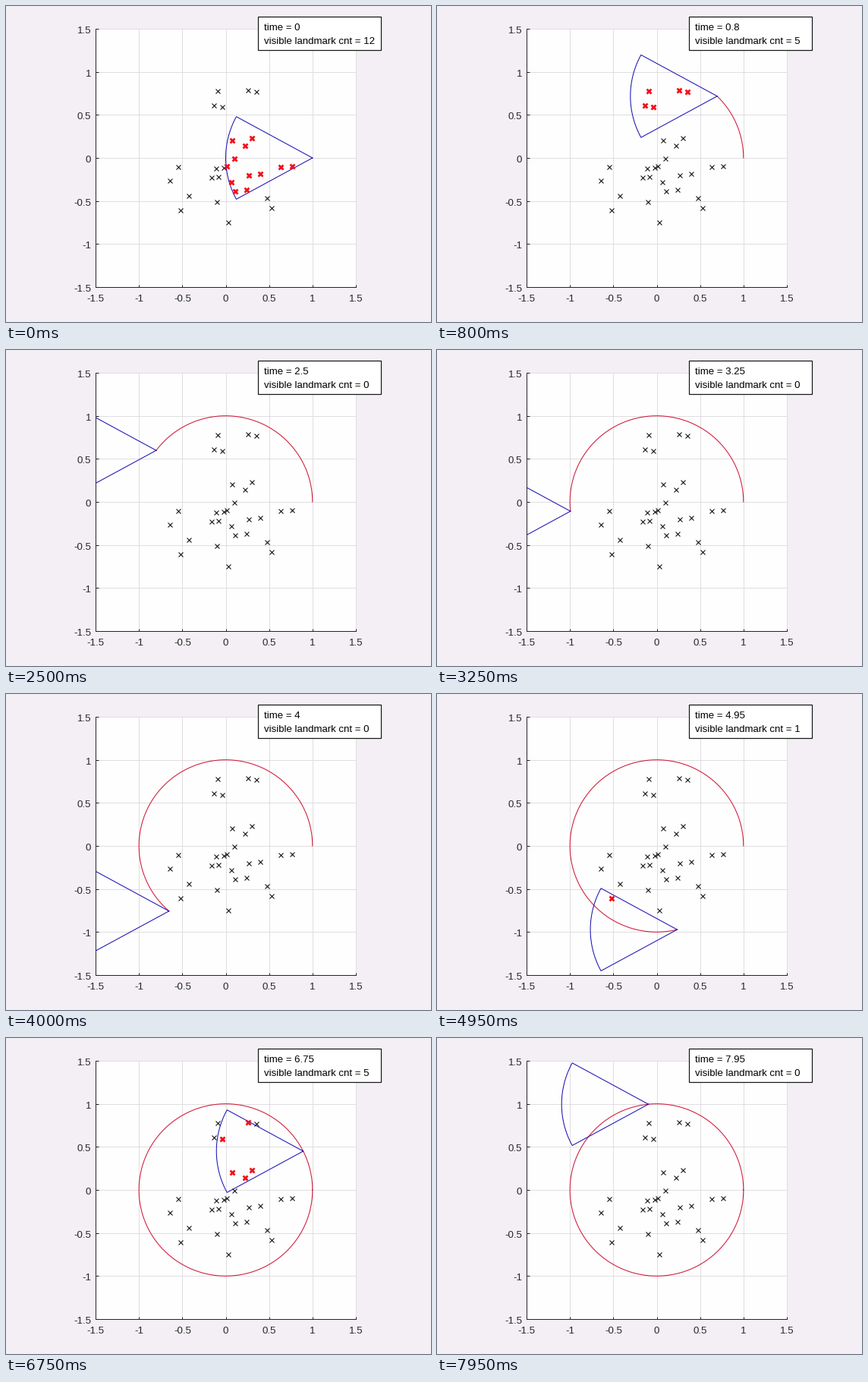
A matplotlib script that plays this animation: 560 by 416 pixels, repeating every 8 s.

```python
import numpy as np
import matplotlib.pyplot as plt
from matplotlib.animation import FuncAnimation
from matplotlib.patches import Rectangle

W, H = 560, 416
PX = 0.72                      # points per pixel at 100 dpi
DT, FRAMES = 0.05, 160
REACH, HALF_ANGLE = 1.0, 0.5   # sensor range and half field of view
LEFT, TOP, RIGHT, BOTTOM = 118, 30, 461, 370
LIM = 1.5
DARK, GRID = "#262626", "#e0dde0"
BLUE, RED_PATH = "#1c14b4", "#cf1838"


def run(start, step, count=2):
    """Evenly spaced landmarks along a line."""
    return np.array(start) + np.outer(np.arange(count), step)


def cell(start, step, fork):
    """A pair of landmarks repeated once: the corners of a parallelogram."""
    pair = run(start, fork)
    return np.vstack([pair, pair + step])


LANDMARKS = np.vstack([
    cell((-0.135, 0.611), (0.395, 0.178), (0.095, -0.022)),
    cell((0.301, 0.231), (-0.202, -0.237), (-0.082, -0.087)),
    cell((-0.024, -0.112), (-0.058, -0.106), (-0.082, -0.009)),
    cell((0.765, -0.095), (-0.37, -0.091), (-0.13, -0.014)),
    cell((0.065, -0.278), (0.414, -0.194), (0.046, -0.114)),
    cell((-0.549, -0.104), (0.122, -0.339), (-0.092, -0.162)),
    run((-0.089, 0.774), (0.165, -0.572), 3),
    run((-0.1, -0.515), (0.13, -0.235)),
])

plt.rcParams["font.family"] = "Liberation Sans"
plt.rcParams["axes.unicode_minus"] = False

fig = plt.figure(figsize=(W / 100, H / 100), dpi=100, facecolor="#f3eff5")
ax = fig.add_axes([LEFT / W, 1 - BOTTOM / H, (RIGHT - LEFT) / W, (BOTTOM - TOP) / H])


def label(x, y, text, ha="left", color=DARK):
    """Text with its baseline at stage pixel (x, y)."""
    return fig.text(x / W, 1 - y / H, text, ha=ha, va="baseline",
                    color=color, fontsize=13.2 * PX, zorder=6)


def setup_axes():
    ticks = np.arange(-LIM, LIM + 0.1, 0.5)
    ax.set(xlim=(-LIM, LIM), ylim=(-LIM, LIM), xticks=ticks, yticks=ticks,
           facecolor="#fefefe", axisbelow=True)
    ax.grid(color=GRID, lw=PX, clip_on=False)
    ax.tick_params(direction="in", length=3.5 * PX, width=PX, color=DARK,
                   labelbottom=False, labelleft=False)
    for side in ("top", "right"):
        ax.spines[side].set_visible(False)
    for side in ("left", "bottom"):
        ax.spines[side].set(color=DARK, linewidth=PX)
    for i, v in enumerate(ticks):
        f = i / (len(ticks) - 1)
        label(LEFT + f * (RIGHT - LEFT), 389, f"{v:g}", "center")
        label(112, BOTTOM - f * (BOTTOM - TOP) + 6, f"{v:g}", "right")


def line(color, zorder, **style):
    return ax.plot([], [], color=color, zorder=zorder, **style)[0]


setup_axes()
trail = line(RED_PATH, 3, lw=1.05 * PX)
wedge = line(BLUE, 3.8, lw=1.05 * PX)
cross = dict(ls="none", marker="x")
hidden = line("black", 3.5, ms=5.6 * PX, mew=PX, **cross)
seen = line("#f5101c", 4, ms=6 * PX, mew=2.7 * PX, **cross)

box = Rectangle((332 / W, 1 - 58 / H), 162 / W, 44 / H, fc="white",
                ec="#141414", lw=1.2 * PX, transform=fig.transFigure, zorder=5)
fig.add_artist(box)
clock = label(340, 32.5, "", color="black")
counter = label(340, 50, "", color="black")

arc = np.pi + np.linspace(-HALF_ANGLE, HALF_ANGLE, 40)
WEDGE_X = np.r_[0, REACH * np.cos(arc), 0]
WEDGE_Y = np.r_[0, REACH * np.sin(arc), 0]


def draw(n):
    t = round(n * DT, 2)
    x, y = np.cos(t), np.sin(t)
    past = np.linspace(0, min(t, 2 * np.pi), n + 1)
    trail.set_data(np.cos(past), np.sin(past))
    wedge.set_data(x + WEDGE_X, y + WEDGE_Y)

    dx, dy = x - LANDMARKS[:, 0], LANDMARKS[:, 1] - y
    visible = (np.hypot(dx, dy) <= REACH) & (np.abs(np.arctan2(dy, dx)) <= HALF_ANGLE)
    seen.set_data(*LANDMARKS[visible].T)
    hidden.set_data(*LANDMARKS[~visible].T)

    clock.set_text(f"time = {t:g}")
    counter.set_text(f"visible landmark cnt = {visible.sum()}")
    return trail, wedge, seen, hidden, clock, counter


anim = FuncAnimation(fig, draw, frames=FRAMES, interval=50, repeat=True,
                     repeat_delay=0, blit=False)
plt.show()
```
